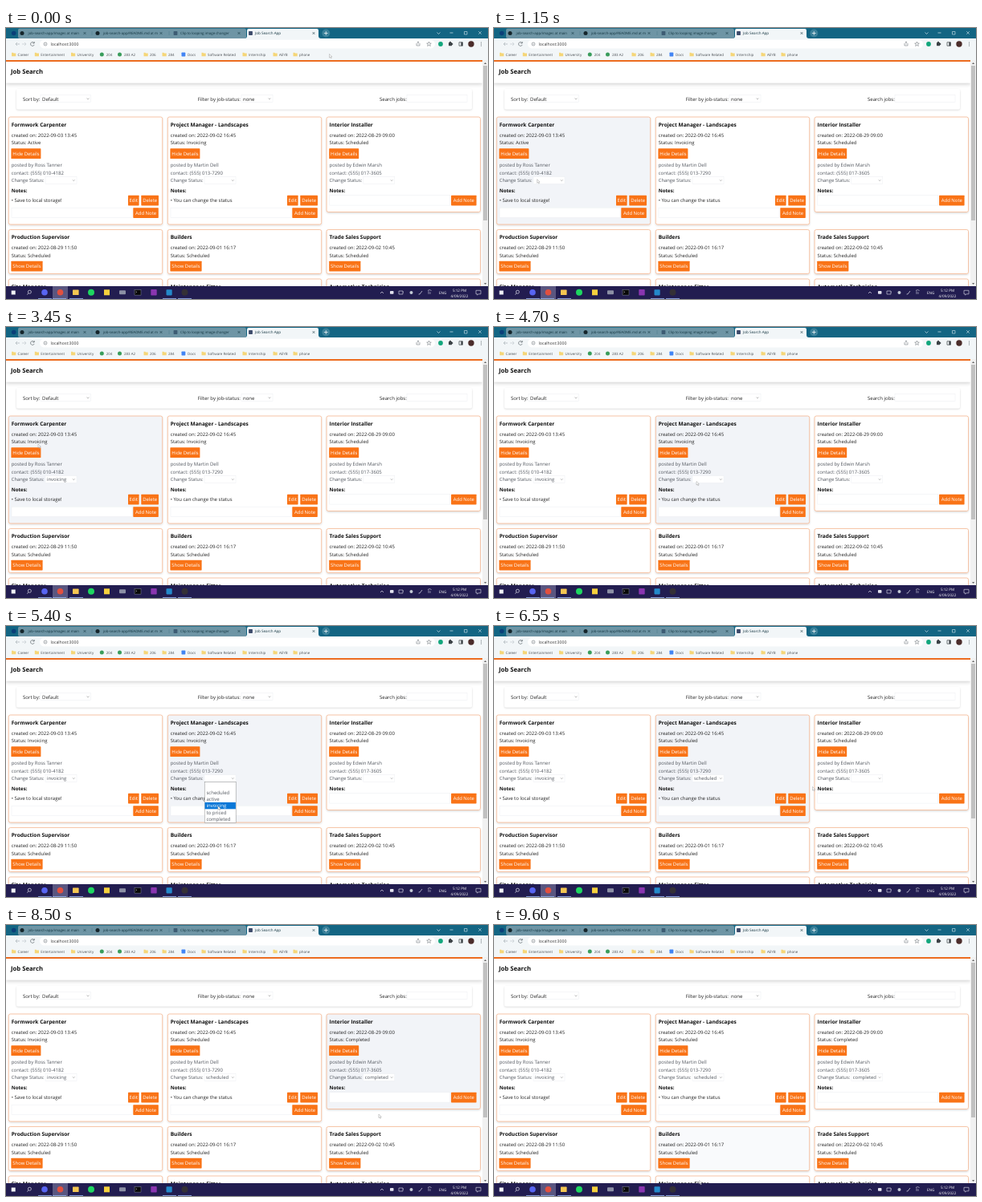
Write an HTML page that moves like this. It is 600 by 338 pixels and loops after 9650 ms.

```html
<!DOCTYPE html>
<html lang="en">
<head>
<meta charset="utf-8">
<title>Job Search App</title>
<style>
  html, body { margin: 0; width: 100%; height: 100%; overflow: hidden; background: #fff; }
  svg { display: block; width: 100%; height: 100%; }
  text { font-family: "Open Sans", "Noto Sans", sans-serif; text-rendering: geometricPrecision; white-space: pre; }
</style>
</head>
<body>
<svg id="stage" viewBox="0 0 600 338"></svg>
<script>
const LOOP = 9650, ORANGE = '#f97316', INK = '#222', SOFT = '#52575f', NAVY = '#221d50';
const OPTIONS = ['', 'scheduled', 'active', 'invoicing', 'to priced', 'completed'];
const MENU_Y = 194.7, ROW_H = 8.4;
const COLS = [3, 201, 398.8];

const rect = (x, y, w, h, fill, more = '') =>
  `<rect x="${x}" y="${y}" width="${w}" height="${h}" fill="${fill}" ${more}/>`;
const disc = (x, y, r, fill) => `<circle cx="${x}" cy="${y}" r="${r}" fill="${fill}"/>`;
const text = (x, y, s, size = 6.03, fill = INK, more = '') =>
  `<text x="${x}" y="${y}" font-size="${size}" fill="${fill}" ${more}>${s}</text>`;
const bold = (x, y, s, size = 6.55) => text(x, y, s, size, '#111', 'font-weight="700"');
const line = (d, color, w = .7) => `<path d="${d}" fill="none" stroke="${color}" stroke-width="${w}"/>`;
const cross = (x, y, color, r = 1.4) =>
  line(`M${x - r} ${y - r}l${2 * r} ${2 * r}m0 ${-2 * r}l${-2 * r} ${2 * r}`, color, .6);
const chevron = (x, y) => line(`M${x - 1.4} ${y - .7}l1.4 1.4 1.4-1.4`, '#777', .5);
const field = (x, y, w, h) => rect(x, y, w, h, '#fff', 'stroke="#eceef1" stroke-width=".5"');
const button = (x, y, w, label) => rect(x, y, w, 12.7, ORANGE, 'rx=".6"') +
  text(x + w / 2, y + 8.7, label, 5.95, '#fff', 'text-anchor="middle"');

function browser() {
  const dark = '#12343f', grey = '#5a6268', bar = '#f2f6f8', pale = '#d5e6ec';
  let s = rect(0, 0, 600, 13, '#136583') + rect(0, 13, 600, 27, bar);
  s += rect(15, .8, 284, 12.2, '#6e95a5', 'rx="2"');
  s += `<path d="M297 13q3 0 3-3V3q0-2 2-2h85q2 0 2 2v7q0 3 3 3z" fill="${bar}"/>`;
  s += disc(9.7, 6.5, 2.8, '#0b3f78');
  [[20, 27.6, 'job-search-app/images at main', '#15252b'],
   [114, 121, 'job-search-app/README.md at m', '#15252b'],
   [211, 217, 'Clip to looping image changer', '#3d5d74'],
   [304.5, 310, 'Job Search App', '#3c4a6a']].forEach(([ix, tx, label, color], i) => {
    s += i < 2 ? disc(ix, 6.5, 2.5, color) : rect(ix - 2.4, 4.1, 4.8, 4.8, color, 'rx=".6"');
    s += text(tx, 8.2, label, i < 3 ? 4.4 : 4.6, dark);
    s += cross([98, 193, 290, 383][i], 6.5, dark);
  });
  s += line('M107 4v5M203 4v5', '#4f7888', .5);
  s += disc(398.3, 6.5, 5, '#3b819a') + line('M395.9 6.5h4.8m-2.4-2.4v4.8', '#fff');
  s += line('M536.5 5.5l2 2 2-2', pale) + line('M552.5 6h4', pale) +
    line('M570.5 4.5h3.5v3.5h-3.5z', pale, .6) + cross(590, 6, pale, 1.8);

  s += rect(42, 14.8, 492, 10.6, '#fff', 'rx="5.3"');
  s += line('M17 20h-5m2-2l-2 2 2 2', '#a6b0b5') + line('M20 20h5m-2-2l2 2-2 2', '#c3cace');
  s += line('M35 18.7a2.4 2.4 0 1 0 .2 2.2M35.2 17v2h-2', grey);
  s += `<circle cx="49" cy="20" r="2" fill="none" stroke="${grey}" stroke-width=".5"/>` + line('M49 19.6v1.4m0-2.2v.3', grey, .5);
  s += text(55.5, 21.8, 'localhost:3000', 5.2, '#333');
  s += line('M511 19v3h4v-3m-2 1.5V17m-1.2 1.2l1.2-1.2 1.2 1.2', grey, .5);
  s += line('M526.5 17.2l.8 1.9 2 .1-1.6 1.3.6 2-1.8-1.1-1.8 1.1.6-2-1.6-1.3 2-.1z', grey, .5);
  s += disc(541, 20, 2.9, '#12a67c');
  s += rect(551, 18, 4.2, 4.2, '#3c4246', 'rx=".6"') + disc(553, 17.8, 1, '#3c4246') + disc(555.4, 20, 1, '#3c4246');
  s += line('M564 17.8h4.4v4.4h-4.4z', '#3c4246') + rect(566.4, 17.8, 2, 4.4, '#3c4246');
  s += disc(579, 20, 3.7, '#4b2c2a') + [18, 20, 22].map(y => disc(591.5, y, .55, grey)).join('');

  [[14.6, 'Career'], [43.3, 'Entertainment'], [88.5, 'University'], [124.8, '204'], [147, '283 A2'],
   [179, '206'], [202, '284'], [226, 'Docs'], [251, 'Software Related'], [302, 'Internship'],
   [340, 'AEYB'], [365, 'phone']].forEach(([x, label], i) => {
    if (i === 3 || i === 4) s += disc(x - 5.5, 33, 2.5, '#3a9d5c');
    else if (label === 'Docs') s += rect(x - 7.5, 30.6, 4.8, 4.8, '#4285f4', 'rx=".7"');
    else s += `<path d="M${x - 7.5} 30.8h1.8l.7.7h2.7v3.8h-5.2z" fill="#f5d678"/>`;
    s += text(x, 34.5, label, 4.45, '#4a4f54');
  });
  return s;
}

function header() {
  return rect(0, 42, 593, 26.3, '#fff', 'filter="url(#deep)"') + rect(0, 40, 593, 2, '#ec6c1f') +
    bold(6, 57.4, 'Job Search', 7.7) +
    rect(13, 76, 567, 25.3, '#fff', 'rx="2" filter="url(#shade)"') +
    field(43, 83.5, 62.5, 9.2) + field(293, 83.5, 39, 9.2) + field(499, 83.5, 75, 9.2) +
    text(21, 90.5, 'Sort by:') + text(45, 90.5, 'Default') + chevron(102, 88.3) +
    text(238.7, 90.5, 'Filter by job-status:') + text(295, 90.5, 'none') + chevron(328, 88.3) +
    text(465, 90.5, 'Search jobs:');
}

function frame(id, x, y, h, title) {
  return rect(x + .3, y, 191.4, h, '#fff', `id="${id}" rx="2.2" stroke="#f5a97a" stroke-width=".65" filter="url(#shade)"`) +
    bold(x + 3.7, y + 11.8, title);
}

function openCard(i, [title, date, who, phone, note]) {
  const x = COLS[i], left = x + 3.7, base = note ? 224.2 : 208.7;
  let s = frame('card' + i, x, 111, note ? 134 : 118.5, title) +
    text(left, 135.6, 'created on: ' + date) + text(left, 145.1, '', 5.92, INK, `id="status${i}"`) +
    button(x + 3.4, 150.3, 37, 'Hide Details') +
    text(left, 173.1, 'posted by ' + who, 6.03, SOFT) + text(left, 182.7, 'contact: ' + phone, 6.03, SOFT) +
    text(left, 192.2, 'Change Status:', 5.88, SOFT) + field(x + 46, 185.4, 39, 9) +
    text(x + 48, 192.2, '', 5.88, SOFT, `id="choice${i}"`) + chevron(x + 81.3, 190) +
    bold(left, 204.6, 'Notes:', 6.1);
  if (note) s += text(left, 217.3, '• ' + note) +
    button(x + 149, 208.7, 13.6, 'Edit') + button(x + 165.3, 208.7, 21.7, 'Delete');
  return s + field(x + 4, base, 150, 12.4) + button(x + 155.3, base, 31.5, 'Add Note');
}

function closedCard(i, [title, date]) {
  const x = COLS[i], left = x + 3.7;
  return frame('low' + i, x, 251.5, 55, title) + text(left, 276.1, 'created on: ' + date) +
    text(left, 285.7, 'Status: Scheduled', 5.92) + button(x + 3.4, 290.7, 39.2, 'Show Details');
}

function cards() {
  return [['Formwork Carpenter', '2022-09-03 13:45', 'Ross Tanner', '(555) 010-4182', 'Save to local storage!'],
    ['Project Manager - Landscapes', '2022-09-02 16:45', 'Martin Dell', '(555) 013-7290', 'You can change the status'],
    ['Interior Installer', '2022-08-29 09:00', 'Edwin Marsh', '(555) 017-3605', '']]
      .map((job, i) => openCard(i, job)).join('') +
    [['Production Supervisor', '2022-08-29 11:50'], ['Builders', '2022-09-01 16:17'],
     ['Trade Sales Support', '2022-09-02 10:45']].map((job, i) => closedCard(i, job)).join('') +
    ['Site Manager', 'Maintenance Fitter', 'Automotive Technician']
      .map((title, i) => frame('next' + i, COLS[i], 313, 55, title)).join('');
}

function scrollbar() {
  return rect(593, 40, 7, 282.3, '#f1f1f1') + rect(594, 47, 5, 193, '#c1c1c1') +
    '<path d="M595 45l1.6-2 1.6 2zM595 318l1.6 2 1.6-2z" fill="#666"/>';
}

function taskbar() {
  const pale = '#e2e2ee';
  let s = rect(0, 322, 600, 16, NAVY) + rect(58, 322, 19, 16, '#5a5680');
  s += rect(6.7, 327.5, 5, 5, '#f2f5f8');
  s += `<circle cx="29.4" cy="329.2" r="2" fill="none" stroke="${pale}" stroke-width=".7"/>` + line('M28 330.8l-1.8 1.8', pale);
  s += disc(48, 329.8, 3.8, '#5865f2') + disc(67.5, 329.8, 3.8, '#e2503f') + rect(83, 326.6, 7.6, 6.4, '#f5c652', 'rx=".6"') +
    disc(106, 329.8, 4, '#1ed760') + rect(122, 326.3, 7, 7, '#f7d13d') + rect(141, 327.3, 8, 5, '#8c90a5', 'rx="1"') +
    rect(160, 326.5, 8, 6.6, '#080808', 'stroke="#98a0a8" stroke-width=".4"') + line('M161.5 328.3l1.2 1-1.2 1', '#fff', .5) +
    rect(180.3, 326.1, 7.4, 7.4, '#8a35b0', 'rx=".8"') + rect(199.5, 326.2, 7.2, 7.2, '#2489ca', 'rx=".8"') +
    disc(222.5, 329.8, 4, '#343036');
  s += [40, 58, 79, 195, 214].map(x => rect(x, 337.1, 17, .9, '#8fa9e6')).join('');
  s += line('M466 331l2-2 2 2', pale) + rect(478, 328, 4.5, 3.8, pale, 'rx=".7"') +
    line('M489 328h5v4h-5zm5 1.3h1', pale, .6) + disc(504.5, 330, 2, '#c4cad5') +
    line('M515 332l3-4m-4.4 4h1.4', pale) + line('M526 331.8v-3.5m2 3.5v-2.5m-3-1.8q2.3-1.8 4.6 0', pale, .6);
  s += text(539, 331.8, 'ENG', 4.6, '#fff') + text(564.5, 328.6, '5:12 PM', 4.6, '#fff', 'text-anchor="middle"') +
    text(564.5, 335.6, '4/09/2022', 4.6, '#fff', 'text-anchor="middle"');
  return s + line('M585 327.3h6v4.5h-3l-1.3 1.3v-1.3H585z', pale, .6);
}

const menu = '<g id="menu">' + rect(0, MENU_Y, 39, 6 * ROW_H + .4, '#fff', 'stroke="#888" stroke-width=".5"') +
  rect(.3, MENU_Y, 38.4, ROW_H, '#0a78d8', 'id="mark"') +
  OPTIONS.map((o, i) => text(2.3, MENU_Y + i * ROW_H + 6.4, o, 6.03, SOFT, `id="opt${i}"`)).join('') + '</g>';
const pointer = '<path id="pointer" d="M0 0v4.6l1.1-1 .8 1.8.8-.4-.8-1.7h1.5z" fill="#fff" stroke="#888" stroke-width=".4"/>';

const shadow = (id, dy, blur, alpha) => `<filter id="${id}" x="-5%" y="-10%" width="110%" height="160%">
  <feDropShadow dx="0" dy="${dy}" stdDeviation="${blur}" flood-color="#000" flood-opacity="${alpha}"/></filter>`;

stage.innerHTML = '<defs>' + shadow('shade', 1.1, 1, .16) + shadow('deep', 2.2, 2.2, .17) + '</defs>' +
  rect(0, 0, 600, 338, '#fff') + cards() + header() + scrollbar() + browser() + taskbar() + menu + pointer;

// Pointer stops: time, x, y
const PATH = [[0, 402.5, 32.5], [100, 402.5, 32.5], [950, 62, 187], [1150, 53.7, 188.7], [1350, 68, 189],
  [1650, 66, 207], [2100, 59.5, 221], [2350, 59.5, 221], [2950, 42, 145], [3950, 38, 147], [4150, 38, 147],
  [4600, 255, 190], [4700, 252, 192.5], [4850, 262, 189], [5150, 262, 199], [5350, 264, 226], [5650, 262, 207],
  [5850, 262, 207], [6150, 275, 192], [6550, 396.5, 200.5], [6900, 460, 190], [7200, 470, 189], [7450, 470, 200],
  [7700, 471, 215], [8200, 465, 240], [8450, 465, 240], [8850, 440, 146], [9150, 440, 146], [9600, 255.5, 318.5], [LOOP, 255.5, 318.5]];
const HOVERS = [['card0', 850, 4350], ['card1', 4350, 6570], ['card2', 6570, 9300], ['low1', 9530, 9700]];
const MENUS = [[0, 1400, 2150], [1, 4880, 5800], [2, 7180, 8400]];
const PICKS = ['invoicing', 'scheduled', 'completed'], STARTS = ['Active', 'Invoicing', 'Scheduled'];

const $ = id => document.getElementById(id);
const clamp = v => Math.max(0, Math.min(1, v));
const mix = (a, b, k) => a + (b - a) * k;

function pointerAt(t) {
  const i = Math.max(1, PATH.findIndex(p => p[0] > t));
  const [t0, x0, y0] = PATH[i - 1], [t1, x1, y1] = PATH[i];
  const k = (t - t0) / (t1 - t0), e = k * k * (3 - 2 * k);
  return [mix(x0, x1, e), mix(y0, y1, e)];
}

function draw(now) {
  const t = Math.floor(now % LOOP / 50) * 50;
  const [x, y] = pointerAt(t);
  $('pointer').setAttribute('transform', `translate(${x} ${y})`);

  for (const [id, from, to] of HOVERS) {
    const k = clamp((t - from) / 150) * clamp(1 - (t - to) / 150);
    $(id).setAttribute('fill', `rgb(${mix(255, 242, k)},${mix(255, 244, k)},${mix(255, 248, k)})`);
  }

  MENUS.forEach(([col, , close]) => {
    const pick = PICKS[col], done = t >= close;
    $('choice' + col).textContent = done ? pick : '';
    $('status' + col).textContent = 'Status: ' + (done ? pick[0].toUpperCase() + pick.slice(1) : STARTS[col]);
  });

  const open = MENUS.find(m => t >= m[1] && t < m[2]);
  $('menu').setAttribute('visibility', open ? 'visible' : 'hidden');
  if (open) {
    const row = Math.max(0, Math.min(5, Math.floor((y - MENU_Y) / ROW_H)));
    $('menu').setAttribute('transform', `translate(${COLS[open[0]] + 46.2} 0)`);
    $('mark').setAttribute('y', MENU_Y + row * ROW_H);
    OPTIONS.forEach((o, i) => $('opt' + i).setAttribute('fill', i === row ? '#fff' : SOFT));
  }
}

const start = performance.now();
(function tick() {
  draw(performance.now() - start);
  requestAnimationFrame(tick);
})();
</script>
</body>
</html>
```
